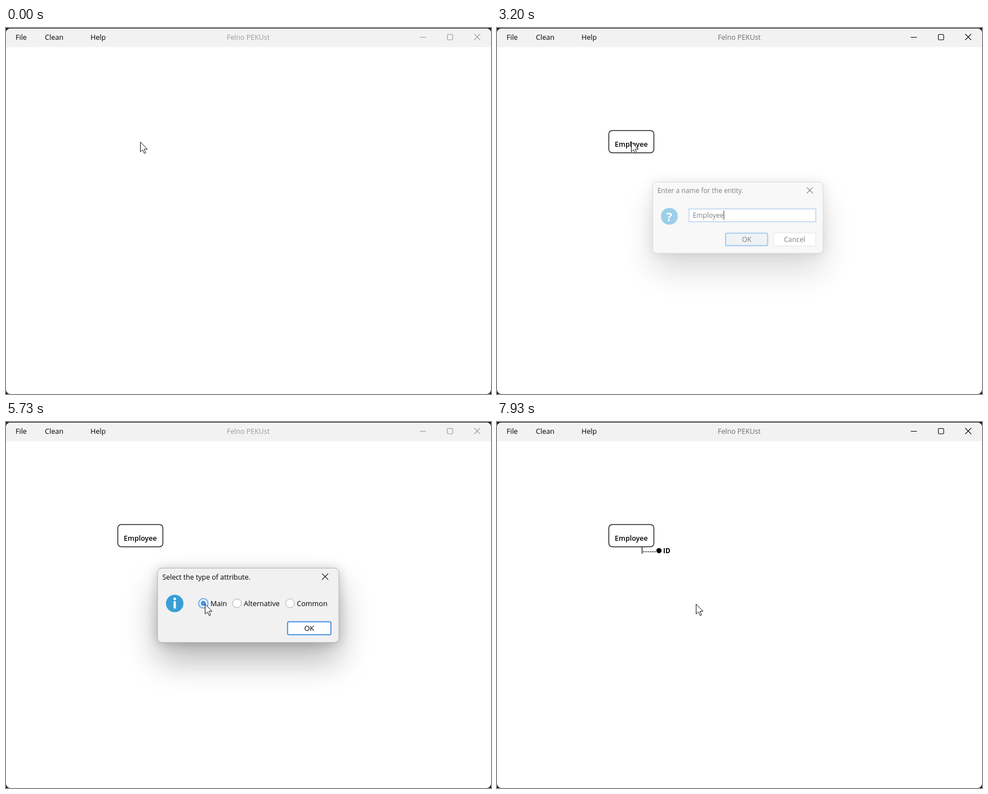
An HTML page that plays this animation: 861 px wide and 650 px high, repeating every 8 s.

```html
<!DOCTYPE html>
<html lang="en">
<head>
<meta charset="utf-8">
<title>Diagram editor</title>
<style>
html, body { margin: 0; width: 100%; height: 100%; overflow: hidden; background: #1c1c1c; }
svg { display: block; width: 861px; height: 650px; font: 12.6px "Open Sans", "Noto Sans", sans-serif; }
text { white-space: pre; }
</style>
</head>
<body>
<svg id="stage" viewBox="0 0 861 650"></svg>
<script>
const LOOP = 8000, TICK = 200 / 3;
const BLUE = '#4a94e4', ICON = '#389fd6';

// ---- markup helpers; text is placed by its vertical middle ----
const text = (x, y, s, attrs = '') => `<text x="${x}" y="${y + 4.9}" ${attrs}>${s}</text>`;
const rect = (x, y, w, h, attrs) => `<rect x="${x}" y="${y}" width="${w}" height="${h}" ${attrs}/>`;
const circle = (x, y, r, attrs = '') => `<circle cx="${x}" cy="${y}" r="${r}" ${attrs}/>`;
const path = (d, attrs = '') => `<path d="${d}" ${attrs}/>`;
const cross = (x, y, r) =>
  path(`M${x - r} ${y - r}l${2 * r} ${2 * r}m0 ${-2 * r}l${-2 * r} ${2 * r}`, 'fill="none" stroke-width="1.2"');

function button(x, y, label, main) {
  const look = main
    ? `class="ok" fill="#fff" stroke="${BLUE}" stroke-width="2" rx="2.5"`
    : 'fill="#fff" stroke="#c4c4c4" rx="3"';
  const d = main ? 1 : 0.5;
  return rect(x + d, y + d, 79 - 2 * d, 25 - 2 * d, look) +
    text(x + 39.5, y + 12.3, label, 'text-anchor="middle"');
}

function dialog(id, x, y, w, h, title, body) {
  return `<g id="${id}">` +
    rect(x, y + 32, w, h, 'rx="8" opacity=".28" filter="url(#far)"') +
    rect(x, y + 2, w, h, 'rx="8" opacity=".19" filter="url(#near)"') +
    rect(x + 0.5, y + 0.5, w - 1, h - 1, 'rx="8" fill="#f1f1f1" stroke="#b2b2b2"') +
    text(x + 9, y + 16, title, 'font-size="12.4"') +
    `<g stroke="#111">${cross(x + w - 25, y + 15.7, 5.5)}</g>` + body + '</g>';
}

function nameDialog(id, title) {
  return dialog(id, 273, 272, 314, 132, title,
    circle(304, 335.5, 15.5, `fill="${ICON}"`) +
    '<text x="304" y="344" text-anchor="middle" font-size="23" font-weight="700" fill="#fff">?</text>' +
    rect(340, 322, 233, 23.5, 'fill="#fff" stroke="#86b4e2" stroke-width="1.8"') +
    text(347, 333.5, '', 'class="field" font-size="12.45"') +
    rect(347, 325, 1.6, 17, 'class="caret"') +
    button(406.5, 365.5, 'OK', true) + button(494.5, 365.5, 'Cancel'));
}

const radio = (x, label, labelX) =>
  circle(x, 322, 7.8, 'fill="#fff" stroke="#aeaeae"') + text(labelX, 321.8, label);

const items = ['Add attribute', 'Add reflexive relationship', 'Rename', 'Delete'];

const stage = document.getElementById('stage');
stage.innerHTML = `
<defs>
  <filter id="far" filterUnits="userSpaceOnUse" x="100" y="120" width="660" height="500"><feGaussianBlur stdDeviation="29"/></filter>
  <filter id="near" filterUnits="userSpaceOnUse" x="200" y="190" width="460" height="300"><feGaussianBlur stdDeviation="10"/></filter>
  <clipPath id="frame">${rect(0, 1, 861, 649, 'rx="8"')}</clipPath>
</defs>
<g clip-path="url(#frame)">
  ${rect(0, 0, 861, 650, 'fill="#fff"')}
  ${rect(0, 0, 861, 34, 'fill="#f2f2f2"')}
</g>
${text(17, 16, 'File')}${text(69, 16, 'Clean')}${text(150, 16, 'Help')}
${text(392, 16, 'Felno PEKUst', 'id="title" font-size="12.4"')}
<g id="controls" fill="none">
  ${path('M734.5 16.5h11')}
  ${rect(783.5, 11.5, 9.5, 9.5, 'rx="1.5" stroke-width="1.1"')}
  ${cross(836.5, 16, 5.3)}
</g>
<g id="entity">
  ${rect(198.5, 182, 80, 39.5, 'rx="6" fill="#fff" stroke="#000" stroke-width="1.25"')}
  ${text(209, 205.6, 'Employee', 'font-weight="600" font-size="12.5"')}
</g>
<g id="attribute">
  ${path('M257.5 222v12', 'stroke="#000" stroke-width="1.2"')}
  ${path('M259 230.5h24', 'stroke="#000" stroke-dasharray="3 1"')}
  ${circle(287.5, 228.5, 4.6)}
  ${text(295, 228.2, 'ID', 'font-weight="700" font-size="11.8"')}
</g>
<g id="menu">
  ${rect(238.5, 202.5, 202, 112, 'fill="#fff" stroke="#b4b4b4"')}
  ${rect(239, 207, 201, 26, 'id="hover" fill="#2675bf"')}
  ${items.map((s, i) => text(262, 220 + 26 * i, s, 'class="item"')).join('')}
</g>
${nameDialog('askEntity', 'Enter a name for the entity.')}
${dialog('askType', 268.5, 259, 323, 133, 'Select the type of attribute.',
    circle(299.5, 322.3, 15.5, `fill="${ICON}"`) +
    circle(299.5, 314.2, 2.4, 'fill="#fff"') + rect(297.5, 318.3, 4, 13, 'fill="#fff"') +
    radio(350.3, 'Main', 363) + radio(410, 'Alternative', 422.3) + radio(504.3, 'Common', 516.3) +
    circle(350.3, 322, 8.3, 'id="ring" fill="none" stroke="#80b3e8" stroke-width="2.2"') +
    circle(350.3, 322, 4.6, `id="dot" fill="${BLUE}"`) +
    button(498.8, 353.7, 'OK', true))}
${nameDialog('askName', 'Enter a name.')}
<g id="arrow">
  ${path('M.5 .5V18L4.6 14.2 7.6 20.8 10.2 19.6 7.3 13.2H12.8Z', 'fill="#fff" stroke="#111"')}
</g>
<g id="beam" fill="none">
  ${path('M354.5 318.5h2.4l1 1 1-1h2.4M358 319.5v13M354.5 333.5h2.4l1-1 1 1h2.4', 'stroke="#000" stroke-width="1.5"')}
</g>`;

// ---- state ----
const el = id => document.getElementById(id);
const show = (id, on) => el(id).setAttribute('visibility', on ? 'visible' : 'hidden');
const within = (n, a, b) => n >= a && n < b;
const ease = p => { p = Math.min(1, Math.max(0, p)); return p * p * (3 - 2 * p); };
const mix = (a, b, p) => Math.round(a + (b - a) * p);

// Pops a dialog up over five ticks and fades it away again.
function pose(id, n, open, close, end, ox, oy) {
  let alpha = 0, scale = 1;
  if (within(n, open, close)) {
    const k = Math.min(5, n - open);
    alpha = Math.min(1, (k + 1) / 3);
    scale = 1 - 0.095 * (1 - k / 5) ** 2;
  } else if (within(n, close, end)) {
    const k = (n - close) / (end - close);
    alpha = 1 - k ** 1.7;
    scale = 1 - 0.05 * k;
  }
  const g = el(id);
  g.setAttribute('opacity', alpha);
  g.setAttribute('transform', `translate(${ox * (1 - scale)} ${oy * (1 - scale)}) scale(${scale})`);
  g.querySelector('.ok').setAttribute('fill', within(n, close, end) ? '#e2e8ee' : '#fff');
}

function type(id, word, times, n, caretOn) {
  const g = el(id), field = g.querySelector('.field'), caret = g.querySelector('.caret');
  const s = word.slice(0, times.filter(k => n >= k).length);
  field.textContent = s;
  caret.setAttribute('x', 346.6 + (s ? field.getComputedTextLength() : 0));
  caret.setAttribute('opacity', caretOn ? 1 : 0);
}

function draw(ms) {
  const n = Math.floor((ms % LOOP + 5) / TICK);
  const active = within(n, 15, 20) || within(n, 46, 70) || n >= 115;
  el('title').setAttribute('fill', active ? '#6c6c6c' : '#9a9a9a');
  el('controls').setAttribute('stroke', active ? '#000' : '#999');

  show('entity', n >= 46);
  show('attribute', n >= 115);

  const hover = within(n, 59, 68);
  show('menu', within(n, 55, 68));
  show('hover', hover);
  document.querySelector('.item').setAttribute('fill', hover ? '#fff' : '#000');

  pose('askEntity', n, 20, 46, 49, 362, 302);
  type('askEntity', 'Employee', [25, 27, 31, 33, 35, 37, 41, 43], n, true);

  pose('askType', n, 70, 90, 93, 358, 289);
  if (within(n, 70, 82)) el('askType').querySelector('.ok').setAttribute('fill', '#e6f0fb');
  show('ring', n >= 82);
  el('dot').setAttribute('cx', n >= 86 ? 350.3 : 504.3);

  pose('askName', n, 91, 114, 119, 362, 302);
  type('askName', 'ID', [105, 106], n, !within(n, 100, 105));

  const a = ease((n - 58) / 4), b = ease((n - 72) / 7);
  const x = mix(mix(238, 311, a), 353, b), y = mix(mix(202, 221, a), 323, b);
  const typing = within(n, 92, 115);
  el('arrow').setAttribute('transform', `translate(${x} ${y})`);
  show('arrow', !typing);
  show('beam', typing);
}

const start = performance.now();
function loop() {
  draw(performance.now() - start);
  requestAnimationFrame(loop);
}
draw(0);
requestAnimationFrame(loop);
</script>
</body>
</html>
```
